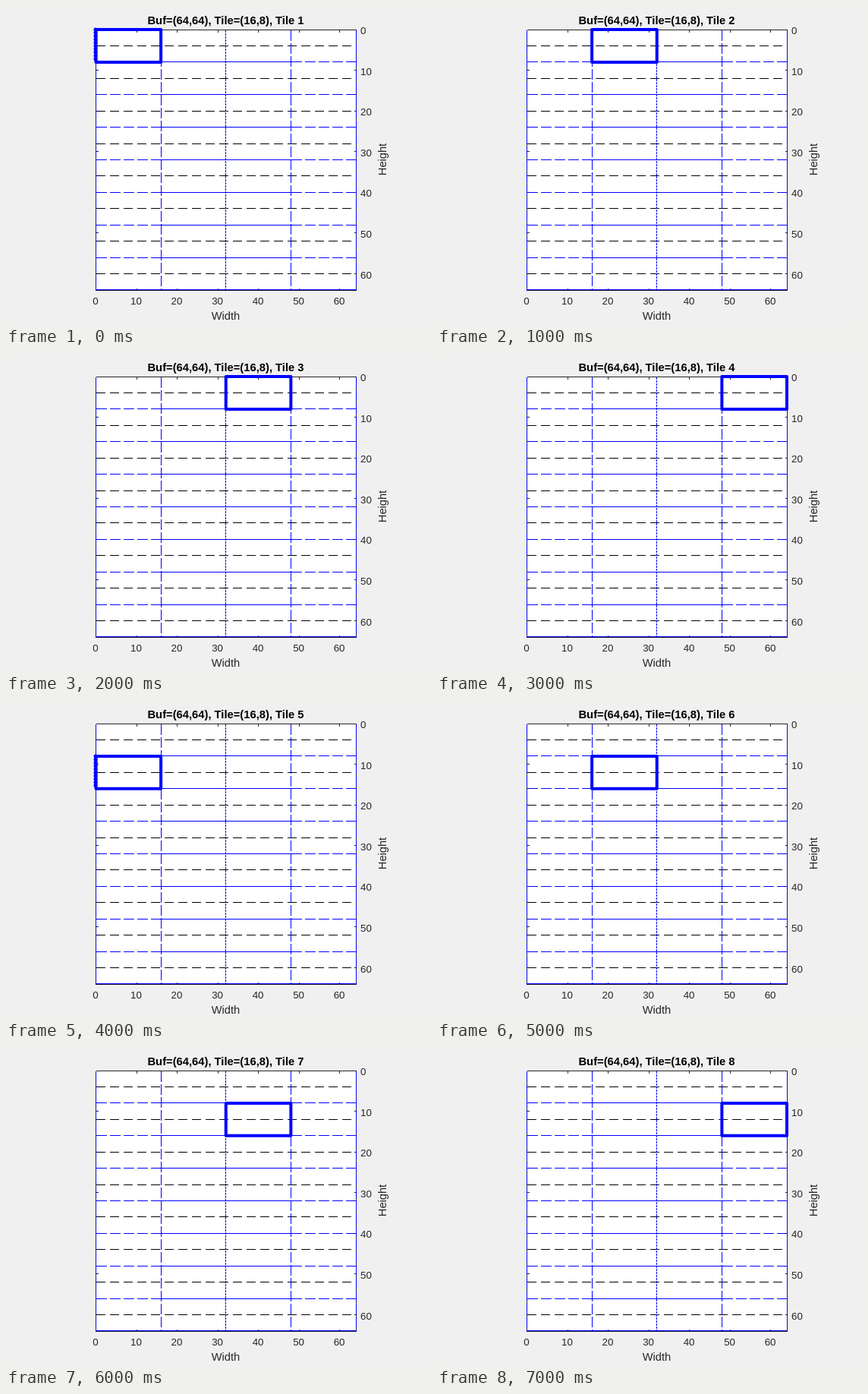
An HTML page that plays this animation: 560 by 420 pixels, repeating every 8000 ms.

```html
<!DOCTYPE html>
<html lang="en">
<head>
<meta charset="utf-8">
<title>Tile order</title>
<style>
html, body { margin: 0; width: 100%; height: 100%; overflow: hidden; background: #f0f0f0; }
svg { display: block; width: 560px; height: 420px; }
text { font-family: Arial, "Liberation Sans", sans-serif; fill: #262626; }
.title { font-size: 14.75px; font-weight: bold; fill: #000; text-anchor: middle; }
.label { font-size: 14.67px; text-anchor: middle; }
.tick { font-size: 13.33px; }
.mid { text-anchor: middle; }
</style>
</head>
<body>
<svg viewBox="0 0 560 420">
  <rect width="560" height="420" fill="#f0f0f0"/>
  <rect x="118" y="31" width="344" height="343" fill="#fff"/>
  <g id="grid" fill="none" shape-rendering="crispEdges"></g>
  <g id="labels"></g>
  <rect id="tile" fill="none" stroke="#00f" stroke-width="4" stroke-linejoin="round"/>
  <path id="beads" fill="none" stroke="#00f" stroke-width="5" stroke-linecap="round" stroke-dasharray="0 4.3"/>
  <text id="title" class="title" x="289.5" y="24"></text>
</svg>
<script>
const LEFT = 118.5, TOP = 31, WIDTH = 342.5, HEIGHT = 343, UNITS = 64;
const TILE_W = 16, TILE_H = 8, COUNT = 8, STEP = 1000;
const BLUE = "#00f", BLACK = "#000", DARK = "#262626";
const get = id => document.getElementById(id);
const px = u => LEFT + u * WIDTH / UNITS;
const py = u => TOP + u * HEIGHT / UNITS;
const snap = v => Math.floor(v) + 0.5;

function add(parent, name, attrs, text) {
  const el = document.createElementNS("http://www.w3.org/2000/svg", name);
  for (const key in attrs) el.setAttribute(key, attrs[key]);
  if (text !== undefined) el.textContent = text;
  get(parent).appendChild(el);
}

function line(x1, y1, x2, y2, stroke, dash = "none") {
  add("grid", "path", {
    d: `M${snap(x1)} ${snap(y1)}L${snap(x2)} ${snap(y2)}`,
    stroke, "stroke-dasharray": dash
  });
}

const across = (u, color, dash, from = 0, to = UNITS) =>
  line(px(from), py(u), px(to), py(u), color, dash);
const down = (u, color, dash) =>
  line(px(u), py(0), px(u), py(UNITS), color, dash);

function drawAxes() {
  const right = px(UNITS), bottom = py(UNITS), len = 3;
  for (const u of [0, UNITS]) {
    across(u, DARK);
    down(u, DARK);
  }
  for (let u = 0; u <= 60; u += 10) {
    const x = px(u), y = py(u);
    line(x, bottom, x, bottom - len, DARK);
    line(x, TOP, x, TOP + len, DARK);
    line(LEFT, y, LEFT + len, y, DARK);
    line(right, y, right - len, y, DARK);
    add("labels", "text", { class: "tick mid", x: x - 0.5, y: 393 }, u);
    add("labels", "text", { class: "tick", x: 467, y: y + 6 }, u);
  }
  add("labels", "text", { class: "label", x: 289.5, y: 413 }, "Width");
  add("labels", "text", { class: "label", transform: "translate(501 202) rotate(-90)" }, "Height");
}

// Tile borders are blue; black dashes halve each tile.
function drawGrid() {
  for (let u = TILE_H / 2; u < UNITS; u += TILE_H) across(u, BLACK, "12 6");
  for (let u = TILE_H; u < UNITS; u += TILE_H) {
    across(u, BLUE, "14 4", 0, 16);
    across(u, BLUE, "none", 16, 48);
    across(u, BLUE, "14 4", 48, 64);
  }
  for (const u of [0, 16, 48, 64]) down(u, BLUE, "14 3");
  down(32, BLUE, "3 1");
  line(px(0), py(UNITS) - 1, px(UNITS), py(UNITS) - 1, BLUE);
}

function render(time) {
  const n = Math.floor(time / STEP) % COUNT;
  const perRow = UNITS / TILE_W;
  const col = n % perRow, row = Math.floor(n / perRow);
  const x = px(col * TILE_W), y = py(row * TILE_H);
  const width = TILE_W * WIDTH / UNITS, height = TILE_H * HEIGHT / UNITS;
  const box = { x, y, width, height };
  for (const key in box) get("tile").setAttribute(key, box[key]);
  get("beads").setAttribute("d", col ? "" : `M${x - 0.5} ${y}v${height}`);
  get("title").textContent = `Buf=(64,64), Tile=(16,8), Tile ${n + 1}`;
}

drawAxes();
drawGrid();
const start = performance.now();
function frame() {
  render(performance.now() - start);
  requestAnimationFrame(frame);
}
render(0);
requestAnimationFrame(frame);
</script>
</body>
</html>
```
